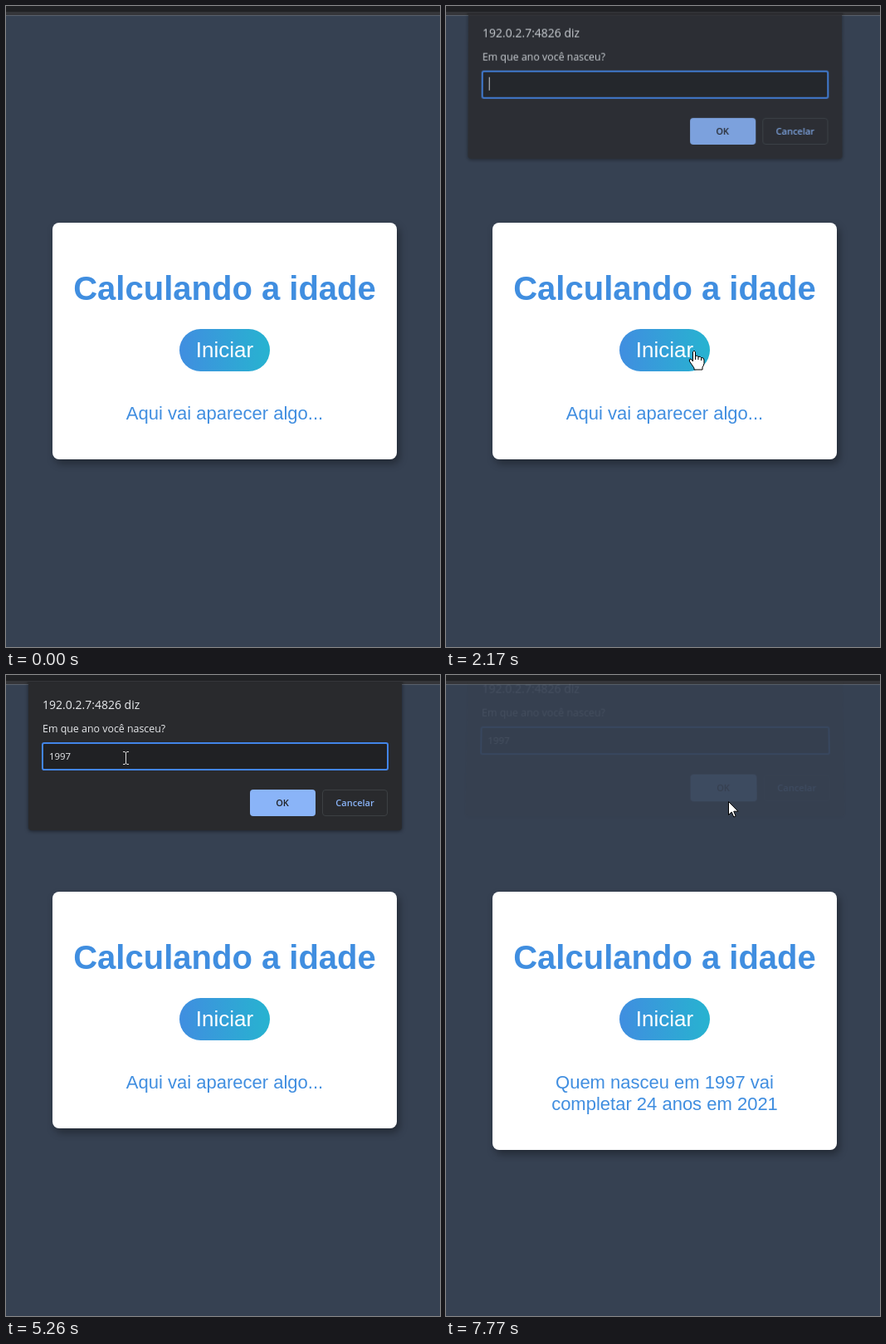
Animation, 523 px wide and 772 px high, one loop 8000 ms. Source, as an HTML page:

```html
<!DOCTYPE html>
<html lang="pt-BR">
<head>
<meta charset="utf-8">
<title>Calculando a idade</title>
<style>
html, body { margin: 0; width: 100%; height: 100%; overflow: hidden; background: #364152; }
svg { position: absolute; left: 0; top: 0; width: 523px; height: 772px; }
#page { font: 22px "Liberation Sans", Arial, sans-serif; fill: #408ee0; text-anchor: middle; }
#clip { position: absolute; left: 0; top: 8px; width: 523px; height: 764px; overflow: hidden; }
#dialog { top: -8px; transform-origin: 252px 11px; font: 12.4px "Open Sans", "Noto Sans", sans-serif; fill: #e8eaed; }
#dialog .button { font-size: 11px; font-weight: 600; text-anchor: middle; }
#card { filter: drop-shadow(3px 5px 5px rgba(0, 0, 0, .35)); }
#panel { filter: drop-shadow(0 1px 2px rgba(0, 0, 0, .5)); }
</style>
</head>
<body>
<svg id="page" viewBox="0 0 523 772">
  <defs>
    <linearGradient id="pill"><stop stop-color="#408ee0"/><stop offset="1" stop-color="#27b3d0"/></linearGradient>
  </defs>
  <rect width="523" height="8" fill="#202124"/>
  <rect y="7" width="523" height="4" fill="#35363a"/>
  <rect y="11" width="523" height="1" fill="#59616c"/>
  <rect id="card" x="56" y="261" width="415" height="285" rx="8" fill="#fff"/>
  <text x="263.5" y="354" font-size="40" font-weight="bold">Calculando a idade</text>
  <rect x="209" y="389" width="109" height="51" rx="25.5" fill="url(#pill)"/>
  <text x="263.5" y="423" font-size="26" fill="#fff">Iniciar</text>
  <text id="line1" x="263.5" y="498"></text>
  <text id="line2" x="263.5" y="524"></text>
</svg>

<div id="clip">
  <svg id="dialog" viewBox="0 0 523 772">
    <rect id="panel" x="27" y="4" width="450" height="183" rx="4" fill="#292a2d"/>
    <text x="44" y="41" font-size="14">192.0.2.7:4826 diz</text>
    <text x="44" y="69">Em que ano você nasceu?</text>
    <rect x="44" y="82" width="416" height="32" rx="2" fill="#202124" stroke="#4285e8" stroke-width="2"/>
    <text id="year" x="52" y="102" font-size="11.4"></text>
    <rect id="caret" y="89" width="1" height="16"/>
    <rect id="ok" x="294" y="138" width="79" height="32" rx="4"/>
    <text class="button" x="333" y="158" fill="#202124">OK</text>
    <rect x="381.5" y="138.5" width="78" height="31" rx="3.5" fill="none" stroke="#3c4043"/>
    <text class="button" x="420.5" y="158" fill="#8ab4f8">Cancelar</text>
  </svg>
</div>

<svg viewBox="0 0 523 772">
  <g id="cursor" fill="#fff" stroke="#000" stroke-linejoin="round">
    <path id="arrow" d="M.5 .5V16.5L4.2 13L6.8 19L9.2 18L6.7 12.2H12Z"/>
    <g id="hand">
      <path d="M-1.5 1.5Q0-1 1.5 1.5V6.5Q4 5.5 5 7.5Q7.5 6.5 8.5 8.5Q11.5 8 12 11V15.5Q11.5 18.5 10 20V23H0V21L-5.5 13Q-6.5 10-4 10L-1.5 13Z"/>
      <path d="M1.5 6.5V11M5 7.5V11M8.5 8.5V12" fill="none"/>
    </g>
    <path id="beam" d="M-3-7.5H-1L.5-6.5L2-7.5H4M.5-6.5V6.5M-3 7.5H-1L.5 6.5L2 7.5H4" fill="none" stroke="#ddd"/>
  </g>
</svg>

<script>
const LOOP = 8000, ANSWER = 7560;
const $ = id => document.getElementById(id);
const clamp = v => Math.max(0, Math.min(1, v));
const show = (id, on) => $(id).style.display = on ? '' : 'none';
const inside = ([x, y], l, t, r, b) => x >= l && x < r && y >= t && y < b;

// time, x, y of the cursor tip
const path = [
  [800, 518, 608], [930, 448, 542], [1070, 385, 485], [1250, 338, 447], [1590, 307, 421],
  [1710, 299, 415], [2200, 299, 415], [2400, 225, 250], [2640, 160, 116], [2700, 159, 115],
  [2860, 143, 95], [3190, 144, 100], [6180, 144, 100], [6330, 356, 262], [6560, 356, 262],
  [6780, 331, 146], [7360, 335, 149], [7700, 340, 152]
];
const keys = [4040, 4320, 4560, 4740];

function cursorAt(t) {
  const i = path.findIndex(p => p[0] > t);
  if (i < 0) return path.at(-1).slice(1);
  const a = path[Math.max(0, i - 1)], b = path[i];
  const k = clamp((t - a[0]) / (b[0] - a[0] || 1));
  return [a[1] + (b[1] - a[1]) * k, a[2] + (b[2] - a[2]) * k];
}

function caretOn(t) {
  const start = t < keys[0] ? 2150 : 4730;
  return Math.floor(Math.max(0, t - start) / 530) % 2 === 0;
}

function draw(t) {
  const answered = t >= ANSWER;
  $('line1').textContent = answered ? 'Quem nasceu em 1997 vai' : 'Aqui vai aparecer algo...';
  $('line2').textContent = answered ? 'completar 24 anos em 2021' : '';
  $('card').setAttribute('height', answered ? 311 : 285);

  // The closing fade stops just short of fully transparent.
  const open = answered ? 1 - clamp((Math.min(t, 7770) - ANSWER) / 228) : clamp((t - 1970) / 240);
  const away = 1 - open;
  $('dialog').style.opacity = open;
  $('dialog').style.transform = away
    ? `translateY(${-21 * away}px) perspective(1000px) rotateX(${5.6 * away}deg)` : 'none';

  const typed = keys.filter(k => t >= k).length;
  $('year').textContent = '1997'.slice(0, typed);
  $('caret').setAttribute('x', Math.round(52 + 6.5 * typed));
  show('caret', caretOn(t));

  const tip = cursorAt(t);
  const beam = t > 2200 && inside(tip, 43, 81, 461, 115);
  const hand = t < 2200 && inside(tip, 209, 389, 317, 440);
  const hover = t > 6560 && inside(tip, 294, 138, 373, 170);
  $('ok').setAttribute('fill', hover && !answered ? '#88aef0' : '#8ab4f8');
  show('cursor', t >= 800);
  show('beam', beam);
  show('hand', hand);
  show('arrow', !beam && !hand);
  $('cursor').setAttribute('transform', `translate(${tip.map(Math.round)})`);
}

const begin = performance.now();
(function tick() {
  draw((performance.now() - begin) % LOOP);
  requestAnimationFrame(tick);
})();
</script>
</body>
</html>
```
